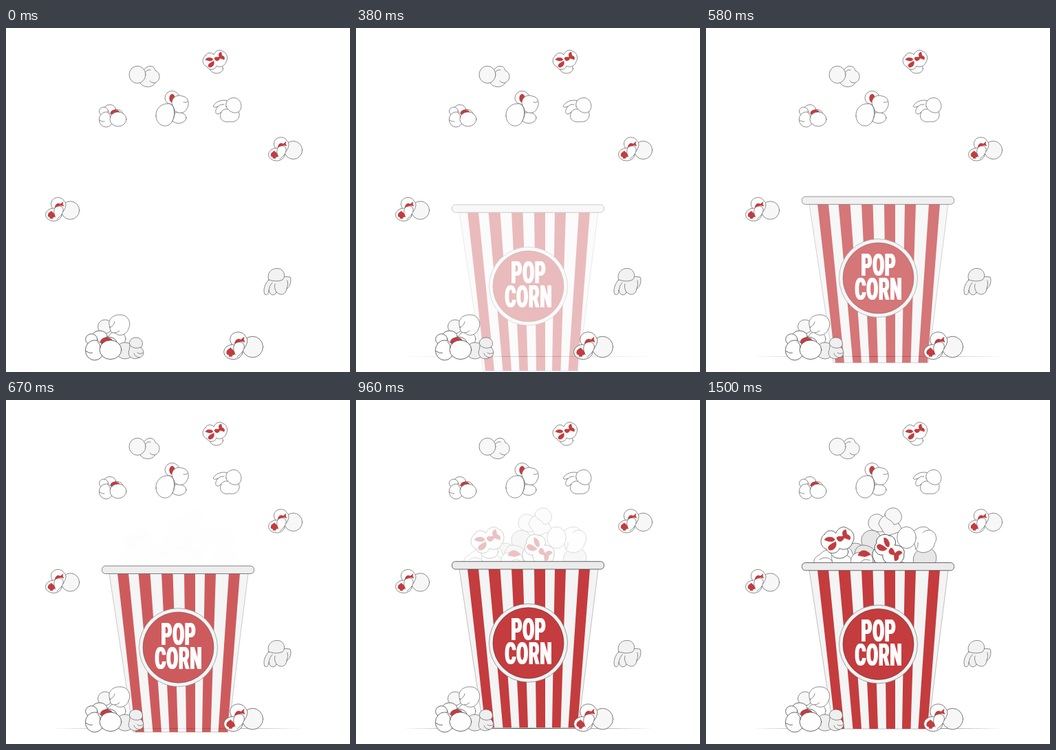
An HTML page that plays this animation: 500 by 500 pixels, repeating every 1.54 s.

```html
<!DOCTYPE html>
<html lang="en">
<head>
<meta charset="utf-8">
<title>Popcorn</title>
<style>
  html, body { margin: 0; height: 100%; overflow: hidden; background: #fff; }
  svg { display: block; width: 100vw; height: 100vh; }
  .corn { fill: #fefefe; stroke: #505050; stroke-width: .65; stroke-linejoin: round; stroke-linecap: round; }
  .corn * { vector-effect: non-scaling-stroke; }
  .red { fill: #c43c3e; stroke: #9d3033; stroke-width: .3; }
  .shade { fill: #f7f7f7; }
  .gray { fill: #f2f2f2; }
  .line { fill: none; }
  text { font: 900 45px Roboto, sans-serif; letter-spacing: 1.5px; text-anchor: middle; fill: #fff; }
</style>
</head>
<body>
<svg viewBox="0 0 500 500">
  <defs>
    <g id="spotted">
      <circle class="shade" cx="36.5" cy="19" r="13.2"/>
      <path d="M10 15C6 9 10 2 15 1C20-1 26 2 27 5C32 9 30 15 26 21L13 21Z"/>
      <ellipse cx="12.3" cy="25.3" rx="11.8" ry="9.3"/>
      <path d="M15 29C11 23 12 13 19 13C25 12 28 17 25 23C23 28 19 29 17 32"/>
      <path class="red" d="M14 15C15 9 19 8 22 10L26 6.500 25.500 10 27 13 23 12Q19 12 14 15Z"/>
      <path class="red" d="M9 20C11 22 15 25 14 28Q12 30 11 29V31H7V29C4 29 3 26 5 23Z"/>
    </g>
    <g id="flower">
      <ellipse cx="20" cy="28" rx="9.500" ry="7"/>
      <path d="M4 9C6 4 14 4 16 8C18 2 25-1 29 3C36 5 37 14 34 18C32 25 24 27 20 24C18 31 8 31 6 25C-1 23-2 13 4 9Z"/>
      <path class="red" d="M4 15C5 11 14 11 15 15C13 18 7 17 4 15Z"/>
      <path class="red" d="M16 17C18 22 14 27 9 26C6 23 9 20 16 17Z"/>
      <path class="red" d="M17 13C18 10 21 12 24 11C22 7 24 4 27 4L28 9C31 10 33 12 31 15L25 13C23 18 18 18 17 13Z"/>
    </g>
    <g id="cluster">
      <ellipse cx="16" cy="8" rx="8.500" ry="6.500"/>
      <ellipse cx="7" cy="11" rx="6.500" ry="6"/>
      <ellipse cx="26" cy="15" rx="9" ry="6.500"/>
      <path class="red" d="M17 13C18 8 28 8 30 12L27 15 18 16Z"/>
      <ellipse cx="10.500" cy="23" rx="10.200" ry="11"/>
      <ellipse cx="28" cy="22.500" rx="12" ry="10.500"/>
      <path class="line" d="M1 24Q5 27 8 26M14 14Q17 17 17 20"/>
    </g>
  </defs>

  <g id="heap" class="corn" opacity="0">
    <g class="shade">
      <path d="M261 190C250 195 235 189 236 178C237 167 248 163 255 168L265 180Z"/>
      <path d="M251 180C254 165 270 163 277 174L286 190 262 198Z"/>
      <path d="M260 166C262 156 277 153 282 163C288 171 282 181 273 181C270 173 260 174 260 166Z"/>
    </g>
    <g fill="#e7e7e7">
      <ellipse cx="217" cy="217" rx="12" ry="9"/>
      <circle cx="240.500" cy="204" r="14.800"/>
      <path d="M218 236C213 222 218 210 229 211C241 212 251 220 250 238Z"/>
      <path d="M302 238C298 222 311 213 322 216C332 215 338 226 333 238Z"/>
    </g>
    <path d="M157 237C155 228 165 226 168 222C177 214 188 218 190 228V238Z"/>
    <path d="M184 238C180 226 185 214 196 213C209 211 217 221 213 238Z"/>
    <path d="M211 238C208 226 218 220 226 222C238 218 245 228 242 238Z"/>
    <path class="red" d="M221 226C223 216 235 217 239 225L231 228Z"/>
    <path class="line" d="M165 232Q175 225 184 234M197 226Q207 224 211 231M225 237Q228 229 238 233"/>
    <use href="#flower" transform="translate(167 183) scale(1.35)"/>
    <path d="M300 193C307 184 320 181 325 189C335 191 337 203 332 209C331 220 313 227 305 217Z"/>
    <ellipse cx="291.500" cy="200" rx="13.800" ry="15.800"/>
    <path class="line" d="M305 217Q309 213 308 207M325 189Q318 189 315 193"/>
    <path d="M244 238C244 229 250 224 259 226L292 238Z"/>
    <use href="#flower" transform="translate(268 217) rotate(65) scale(1.35) translate(-18 -14)"/>
  </g>

  <path id="ground" d="M67 477.500L250 476.900 433 477.500 250 478.100Z" fill="#444" opacity="0"/>

  <g id="bucket" opacity="0" stroke="#666" stroke-width=".6">
    <path d="M150 247H352L323 478H185Z" fill="#f4f4f4" stroke="#999"/>
    <path id="stripes" fill="#c43c3e" stroke="none"/>
    <rect x="139.500" y="236.500" width="221" height="11.300" rx="5" fill="#ebebeb" stroke="#444" stroke-width=".8"/>
    <circle cx="250.500" cy="355" r="57" fill="#f2f2f2"/>
    <circle cx="250.500" cy="355" r="51.500" fill="#c43c3e" stroke="#5a3030"/>
    <g stroke="none">
      <g id="label">
        <text transform="translate(251 351) scale(.54 1)">POP</text>
        <text transform="translate(251 386) scale(.54 1)">CORN</text>
      </g>
      <use href="#label" x="-.7"/>
      <use href="#label" x=".7"/>
    </g>
  </g>

  <g class="corn">
    <use href="#spotted" x="57" y="246"/>
    <use href="#spotted" x="381" y="158.500"/>
    <use href="#spotted" transform="translate(316 441.500) scale(1.16)"/>
    <use href="#flower" x="286" y="31"/>
    <use href="#cluster" x="135" y="110"/>

    <g class="shade">
      <path d="M197 62C203 61 203 55 210 55.500C216 56 216 60 217 62C226 65 224 78 217 79C214 87 200 88 195 80Z"/>
      <ellipse cx="191" cy="67.800" rx="12" ry="12.500"/>
      <path class="line" d="M203 64Q205 60 210 61M216 80Q211 80 209 77"/>
    </g>

    <ellipse cx="241.500" cy="101.500" rx="10.500" ry="10"/>
    <ellipse class="red" cx="241.500" cy="102" rx="4" ry="6"/>
    <ellipse cx="251" cy="130.500" rx="11" ry="8"/>
    <path d="M241 109C241 100 250 96 256 99C264 99 268 110 263 117C260 125 250 125 245 120Z"/>
    <path fill="#ccc" d="M238 110C247 113 248 130 239 138Z"/>
    <path d="M218 128C217 117 226 109 237 110C246 111 247 129 240 138C234 146 219 143 218 128Z"/>
    <path class="line" d="M258 108Q262 109 264 107"/>

    <path d="M323 106C314 103 304 107 301 114C303 116 305 115 308 114C303 120 304 126 309 125Q311 124 313 122C308 133 317 138 325 136C335 138 342 130 338 121Z"/>
    <path d="M320 114C318 106 325 101 332 101.500C341 102 345 115 339 121C334 126 323 122 320 114Z"/>
    <path class="line" d="M308 114Q312 110 317 111M313 122Q316 117 322 118"/>

    <g class="gray">
      <path d="M383 365C377 370 373 380 376 387C380 389 382 386 382 381C383 389 391 390 393 384C400 390 407 387 408 379C414 376 415 366 413 362L402 361Z"/>
      <path d="M382 366C378 356 387 349 394 349.500C403 349 408 360 402 366C395 369 389 368 382 366Z"/>
      <path class="line" d="M382 381Q383 374 387 370M393 384Q389 377 391 372M408 379Q411 372 409 367"/>
    </g>

    <ellipse class="shade" cx="144" cy="434" rx="10.500" ry="10"/>
    <ellipse cx="161" cy="452" rx="13" ry="11"/>
    <path d="M151 435C146 423 157 416 166 417C177 416 183 429 178 437C175 447 164 449 158 443Q151 444 151 435Z"/>
    <path class="line" d="M151 435Q157 433 158 427M158 443Q162 443 165 440"/>
    <g fill="#efefef">
      <ellipse cx="173" cy="469" rx="13" ry="12"/>
      <path d="M180 461C177 453 185 449 190 450C198 450 201 460 196 464C202 470 201 477 194 479C185 484 175 477 179 468Z"/>
      <path class="line" d="M180 461Q187 468 196 464M199 472Q195 475 191 472M194 479Q187 478 186 473"/>
    </g>
    <use href="#cluster" transform="translate(115 438) scale(1.32)"/>
  </g>
</svg>
<script>
  const LOOP = 1540;
  const byId = id => document.getElementById(id);
  const [heap, ground, bucket] = ['heap', 'ground', 'bucket'].map(byId);

  // Each stripe: left edge and width at the top, then at the bottom.
  const stripes = [
    [162, 16, 188, 13], [192.5, 17, 213.5, 12.5], [226, 16.5, 237.5, 12.5],
    [259, 16, 262, 13], [289, 16, 285, 12.5], [324, 16, 308.5, 13.5]
  ];
  byId('stripes').setAttribute('d', stripes.map(([x, w, x2, w2]) =>
    `M${x} 247H${x + w}L${x2 + w2} 478H${x2}Z`).join(''));

  function ease(t, start, end) {
    const u = Math.min(1, Math.max(0, (t - start) / (end - start)));
    return (1 - Math.cos(Math.PI * u)) / 2;
  }

  function draw(now) {
    const t = now % LOOP;
    const rise = 52.6 * (Math.max(0, 1020 - t) / 980) ** 2;
    const y = rise - 2 + 2 * ease(t, 1130, 1500);
    const shown = ease(t, 40, 900);
    bucket.setAttribute('transform', `translate(0 ${y})`);
    bucket.setAttribute('opacity', shown);
    ground.setAttribute('opacity', shown);
    heap.setAttribute('opacity', ease(t, 640, 1500));
    requestAnimationFrame(() => draw(performance.now()));
  }
  draw(performance.now());
</script>
</body>
</html>
```
